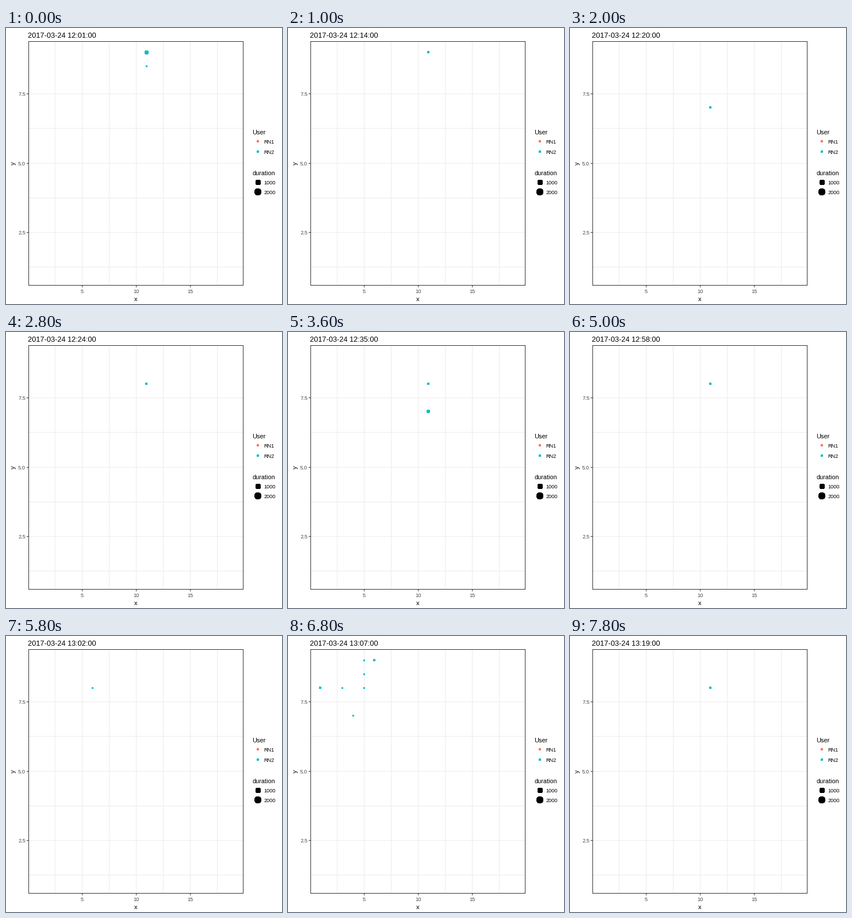
Write a matplotlib script that moves like this. It is 480 by 480 pixels and loops after 8 s.

```python
import math

import matplotlib.pyplot as plt
from matplotlib.animation import FuncAnimation
from matplotlib.patches import Circle, Rectangle

SIZE, DPI = 480, 80
LEFT, TOP, RIGHT, BOTTOM = 39, 23, 412, 447
TEAL, CORAL = "#00BFC4", "#F8766D"
GRID, DARK, GREY = "#EBEBEB", "#333333", "#4D4D4D"
TINY, SMALL, MID, BIG = 3, 4, 6, 7  # dot sizes in pixels

# minutes after 12:00 with at least one visit
MINUTES = [1, 2, *range(11, 19), *range(20, 26), *range(33, 36),
           *range(40, 44), 53, *range(57, 72), 79]

DESK, SIDE, ROOM, HALL = [(11, y) for y in (9, 8.5, 8, 7)]

# minutes with more than a plain visit, as (place, size)
SPECIAL = {
    1: [(DESK, BIG), (SIDE, TINY)],
    12: [(DESK, SMALL), (SIDE, SMALL)],
    20: [(HALL, SMALL)],
    25: [((17, 8), BIG)],
    35: [(ROOM, SMALL), (HALL, MID)],
    43: [(HALL, BIG)],
    60: [((8, 8), TINY), ((9, 7), TINY)],
    67: [((1, 8), SMALL), ((3, 8), TINY), ((4, 7), TINY),
         *[((5, y), TINY) for y in (8, 8.5, 9)], ((6, 9), SMALL)],
    68: [((6, 9), SMALL)],
    69: [((5, 8), TINY), ((4, 7), TINY)],
    70: [((9, 7), TINY)],
    71: [((12, 8), SMALL), (HALL, BIG)],
    79: [(ROOM, SMALL)],
}


def visits(minute):
    if minute in SPECIAL:
        return SPECIAL[minute]
    if minute > 60:  # walk to the far left
        return [((round(7 - 1.2 * (minute - 61)), 8), TINY)]
    pair = (DESK, SIDE) if minute < 16 else (ROOM, HALL)
    return [(pair[minute % 2], SMALL)]


fig = plt.figure(figsize=(SIZE / DPI, SIZE / DPI), dpi=DPI, facecolor="white")
ax = fig.add_axes([0, 0, 1, 1])
ax.set_xlim(0, SIZE)
ax.set_ylim(SIZE, 0)
ax.axis("off")


def px(x):
    return math.floor(132 + 18.8 * (x - 5))


def py(y):
    return math.floor(235 + 48.2 * (5 - y))


def bar(x, y, w, h, color):
    ax.add_patch(Rectangle((x, y), w, h, fc=color, lw=0, antialiased=False))


def text(x, y, s, size, color="black", **kw):
    kw.setdefault("va", "baseline")
    return ax.text(x, y, s, fontsize=size * 72 / DPI, color=color,
                   family="Liberation Sans", **kw)


def place(dot, x, y, size):
    """Centre a dot on a pixel, or on a pixel corner if its size is even."""
    half = size % 2 / 2
    dot.set_center((x + half, y + half))
    dot.set_radius(size / 2 - 0.2)
    dot.set_visible(True)


def new_dot(color):
    dot = Circle((0, 0), 1, fc=color, lw=0, antialiased=False,
                 visible=False, zorder=3)
    return ax.add_patch(dot)


def draw_panel():
    w, h = RIGHT - LEFT + 1, BOTTOM - TOP + 1
    for i in range(1, 8):
        bar(px(2.5 * i), TOP, 1, h, GRID)
    for i in range(1, 7):
        bar(LEFT, py(1.25 * i), w, 1, GRID)
    for y in (TOP, BOTTOM):
        bar(LEFT, y, w, 1, DARK)
    for x in (LEFT, RIGHT):
        bar(x, TOP, 1, h, DARK)
    for x in (5, 10, 15):
        bar(px(x), BOTTOM + 1, 1, 3, DARK)
        text(px(x) + 0.3, 461, str(x), 9.3, GREY, ha="center")
    for y in (2.5, 5.0, 7.5):
        bar(LEFT - 3, py(y), 3, 1, DARK)
        text(34, py(y) + 4, f"{y:.1f}", 9.3, GREY, ha="right")
    text(226, 475, "x", 11, ha="center")
    text(12.5, 235.5, "y", 11, ha="center", va="center", rotation=90)


def legend_key(label, color, y, size):
    place(new_dot(color), 438, y, size)
    text(448, y + 4, label, 9.2)


def draw_legend():
    text(428.5, 185, "User", 11)
    legend_key("RN1", CORAL, 197, SMALL)
    legend_key("RN2", TEAL, 215, SMALL)
    text(428.5, 256, "duration", 10.8)
    legend_key("1000", "black", 268, 9)
    legend_key("2000", "black", 285, 12)


draw_panel()
draw_legend()
title = text(38.5, 17, "", 12.8)
dots = [new_dot(TEAL) for _ in range(max(map(len, SPECIAL.values())))]


def update(i):
    minute = MINUTES[i]
    title.set_text(f"2017-03-24 {12 + minute // 60}:{minute % 60:02d}:00")
    for dot in dots:
        dot.set_visible(False)
    for dot, ((x, y), size) in zip(dots, visits(minute)):
        place(dot, px(x), py(y), size)
    return [title, *dots]


anim = FuncAnimation(fig, update, frames=len(MINUTES), interval=200,
                     repeat=True, repeat_delay=0, blit=False)
plt.show()
```
